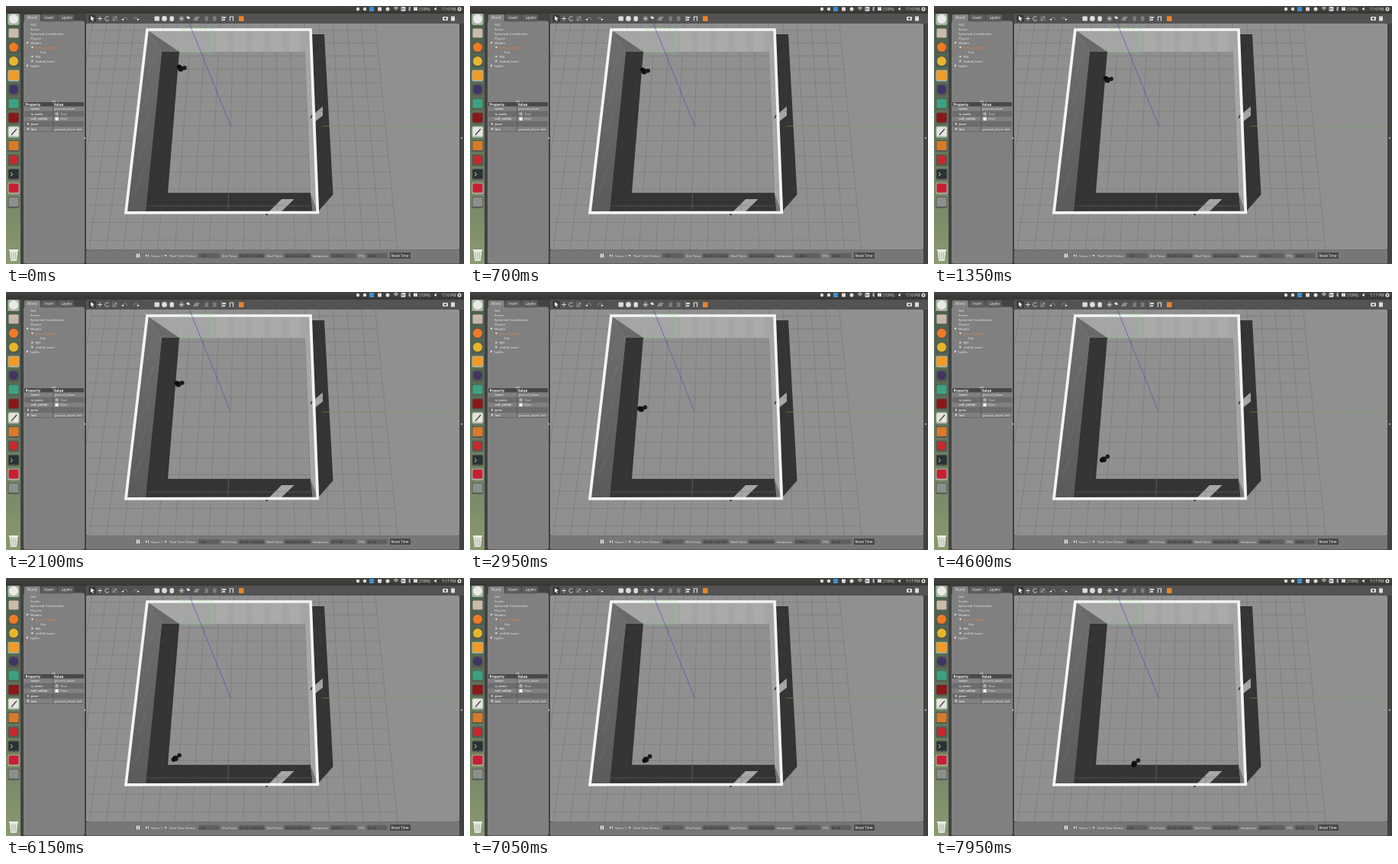
These frames come from a looping animation (600 px wide and 338 px high, 8000 ms). An HTML page with a canvas:

```html
<!DOCTYPE html>
<html lang="en">
<head>
<meta charset="utf-8">
<title>Robot simulation</title>
<style>
html, body { margin: 0; width: 100%; height: 100%; overflow: hidden; background: #383838; }
canvas { display: block; width: 600px; height: 338px; }
</style>
</head>
<body>
<canvas id="stage"></canvas>
<script>
const canvas = document.getElementById('stage');
const ratio = window.devicePixelRatio || 1;
canvas.width = 600 * ratio;
canvas.height = 338 * ratio;
const ctx = canvas.getContext('2d');
ctx.scale(ratio, ratio);

// Drawing helpers
function rect(x, y, w, h, color) {
  ctx.fillStyle = color;
  ctx.fillRect(x, y, w, h);
}
function frame(x, y, w, h, color, width = 0.7) {
  ctx.strokeStyle = color;
  ctx.lineWidth = width;
  ctx.strokeRect(x, y, w, h);
}
function tile(x, y, w, h, r, color) {
  ctx.fillStyle = color;
  ctx.beginPath();
  ctx.roundRect(x, y, w, h, r);
  ctx.fill();
}
function disc(x, y, r, color) {
  ctx.fillStyle = color;
  ctx.beginPath();
  ctx.arc(x, y, r, 0, 2 * Math.PI);
  ctx.fill();
}
function arc(x, y, r, from, to, color) {
  ctx.beginPath();
  ctx.arc(x, y, r, from, to);
  ctx.strokeStyle = color;
  ctx.lineWidth = 0.9;
  ctx.stroke();
}
function trace(points) {
  ctx.beginPath();
  for (let i = 0; i < points.length; i += 2) ctx.lineTo(points[i], points[i + 1]);
}
function poly(color, ...points) {
  trace(points);
  ctx.fillStyle = color;
  ctx.fill();
}
function line(color, width, ...points) {
  trace(points);
  ctx.strokeStyle = color;
  ctx.lineWidth = width;
  ctx.stroke();
}
function text(value, x, y, color, size = 4.3, weight = 400) {
  ctx.font = `${weight} ${size}px "Open Sans", "Noto Sans", sans-serif`;
  ctx.fillStyle = color;
  ctx.fillText(value, x, y);
}
function vertical(y0, y1, ...colors) {
  const g = ctx.createLinearGradient(0, y0, 0, y1);
  colors.forEach((c, i) => g.addColorStop(i / (colors.length - 1), c));
  return g;
}

const icon = '#ddd';

function drawTopBar(t) {
  rect(0, 0, 600, 10, vertical(0, 10, '#454340', '#383633'));
  disc(461, 4, 2.2, icon);
  disc(470, 4, 2.2, icon);
  tile(476, 1, 6, 6, 1, '#3b8fd8');
  tile(487, 1.5, 5, 5, 1, icon);
  disc(500, 4, 2.5, icon);
  for (let r = 1.5; r < 5; r += 1.5) arc(511, 6, r, -2.4, -0.75, icon);
  tile(517.5, 1, 6, 5.8, 1, icon);
  text('En', 518.2, 5.4, '#393734', 3.6, 600);
  line(icon, 0.7, 527, 2.3, 530, 5, 528.5, 6.3, 528.5, 1, 530, 2.3, 527, 5);
  rect(534, 1.5, 5, 4.5, icon);
  text('(100%)', 541, 5.6, icon, 4.7);
  poly(icon, 561, 3, 562.3, 3, 564, 1.3, 564, 6, 562.3, 4.7, 561, 4.7);
  text(t < 3000 ? '7:16 PM' : '7:17 PM', 571, 5.8, '#e4e2dd', 4.9);
  disc(594, 4, 2.6, icon);
  disc(594, 4, 1, '#393734');
}

function drawLauncher() {
  rect(0, 10, 19, 328, vertical(10, 338, '#47604a', '#62765a', '#8a9a72'));
  const colors = ['#e9ece6', '#c9b9a8', '#ef7a21', '#e5b72b', '#f39a24', '#3f3663', '#3ca27f',
    '#8c1719', '#e6e6e0', '#d97a2b', '#c6282c', '#2b3233', '#c81f35', '#8b908a'];
  colors.forEach((color, i) => {
    const y = 17 + i * 18.45;
    tile(2.5, y - 7, 15, 15, 2, i % 4 ? '#555a55' : '#a9b3a6');
    if ([0, 2, 3, 5, 10].includes(i)) disc(10, y, 6, color);
    else tile(3.5, y - 6, 13, 12, 1.5, color);
  });
  line('#444', 1.3, 7, 169, 14, 161);
  line('#eee', 0.9, 6, 218, 8.5, 220.5, 6, 223);
  poly('#dfe3da', 4.5, 321, 15.5, 321, 14, 334, 6, 334);
  rect(4, 319, 12, 2, '#eef0ea');
  for (let x = 7.5; x < 13; x += 2.5) line('#9ca596', 0.6, x, 323, x, 332);
}

function arrow(x, y, open) {
  if (open) poly('#eee', x - 1.6, y - 1, x + 1.6, y - 1, x, y + 1.2);
  else poly('#eee', x - 1, y - 1.6, x + 1.4, y, x - 1, y + 1.6);
}

function drawSidePanel() {
  rect(19, 10, 86, 328, '#424242');
  tile(23, 19.5, 80, 318, 3, '#808080');
  ['World', 'Insert', 'Layers'].forEach((label, i) => {
    tile(24 + i * 22, 11, 21, 9.5, 1.5, i ? '#5c5c5c' : '#808080');
    text(label, 28 + i * 22.2, 17, '#eee', 4.6);
  });
  // Each leading space is one tree level; + is open and > is closed
  const tree = ['GUI', 'Scene', 'Spherical Coordinates', 'Physics', '+Models',
    ' +ground_plane', '  link', ' >RRL', ' >mobile_base', '>Lights'];
  tree.forEach((entry, i) => {
    const x = 32 + 6.5 * entry.search(/\S/), y = 26 + i * 5.95;
    if (/[+>]/.test(entry)) arrow(x - 4, y - 1.5, entry.includes('+'));
    text(entry.replace(/[ +>]/g, ''). replace('lC', 'l C'), x, y,
      entry.includes('ground') ? '#e77c35' : '#eee');
  });
  rect(60, 124.5, 5, 0.9, '#ddd');
  rect(24, 126, 78, 6, '#484848');
  text('Property', 25.5, 130.8, '#f0f0f0', 4.5, 700);
  text('Value', 62.5, 130.8, '#f0f0f0', 4.5, 700);
  const properties = [['name', 'ground_plane'], ['is_static', 'True'], ['self_collide', 'False'],
    ['pose', ''], ['link', 'ground_plane::link']];
  properties.forEach(([name, value], i) => {
    const y = 131.5 + i * 6.6, checkbox = i === 1 || i === 2;
    rect(24, y, 78, 6.6, i % 2 ? '#6c6c6c' : '#808080');
    line('#505050', 0.5, 24, y + 6.6, 102, y + 6.6);
    if (i > 2) arrow(29, y + 3.2, false);
    text(name, 32.5, y + 4.6, '#f2f2f2', 4.2, 600);
    text(value, checkbox ? 71 : 63.5, y + 4.6, '#e8e8e8', 4.2);
    if (checkbox) tile(64.5, y + 1.1, 4.2, 4.2, 0.5, i === 1 ? '#aaa' : '#fff');
  });
  line('#4c4c4c', 0.5, 61.5, 126, 61.5, 164);
  poly(icon, 103.8, 171.5, 102, 173, 103.8, 174.5);
}

function drawToolbar() {
  rect(105, 10, 495, 13, '#535353');
  tile(108.5, 11.5, 9, 9.5, 1, '#383838');
  poly('#eee', 111, 13, 116, 16.5, 113.7, 17, 114.8, 19.5, 113.5, 20, 112.5, 17.8, 111, 19);
  line(icon, 0.9, 120, 16.5, 126, 16.5);
  line(icon, 0.9, 123, 13.5, 123, 19.5);
  arc(132.5, 16.5, 2.7, 0.4, 5.6, icon);
  line(icon, 0.9, 140, 19, 145, 14);
  frame(140, 14, 5, 5, '#aaa', 0.5);
  for (const side of [-1, 1]) {
    const x = 163 + side * 7;
    arc(x, 18, 3, -Math.PI, 0, '#888');
    arrow(x + side * 3, 18, true);
  }
  tile(194.5, 13.5, 6.5, 6, 1, icon);
  disc(207.5, 16.5, 3.4, icon);
  tile(214.5, 13.2, 5.5, 6.8, 2, icon);
  for (let a = 0; a < 3; a += Math.PI / 4) {
    const dx = Math.cos(a) * 3.5, dy = Math.sin(a) * 3.5;
    line(icon, 0.7, 230 - dx, 16.5 - dy, 230 + dx, 16.5 + dy);
  }
  poly(icon, 236, 14, 240, 13.5, 241, 17, 238, 17);
  for (let x = 247; x < 252; x += 2) line(icon, 0.8, x + 2, 14, x - 1, 19);
  rect(260.5, 13.5, 4.5, 6, '#7c7c7c');
  rect(271, 13.5, 4.5, 6, '#7c7c7c');
  line(icon, 0.9, 283, 13, 283, 20);
  rect(284, 14, 4, 2, icon);
  rect(284, 17, 3, 2, icon);
  line(icon, 1.2, 293.5, 19.5, 293.5, 14, 297.5, 14, 297.5, 19.5);
  tile(305, 13.2, 6.5, 6.8, 1, '#ee8327');
  tile(572, 14, 7, 5, 1, icon);
  disc(575.5, 16.5, 1.5, '#555');
  rect(583, 13.5, 5, 6, icon);
}

// Ground coordinates in metres to stage position
function project(across, toward) {
  const scale = 1 / (1 - 0.0127 * toward);
  const down = 19.5 * toward * scale;
  return [294 + 20.3 * across * scale - 0.034 * down, 157 + down];
}

// Time travelled since a start, with a soft pull-away of the given width
function travel(t, start, width) {
  return width * Math.log(1 + Math.exp((t - start) / width));
}

// Drives down to the corner, stops to turn, then follows the near wall
function drawRobot(t) {
  const descent = Math.min(0.04 * travel(t, 1150, 400), 155);
  const along = 0.0368 * travel(t, 6850, 150);
  const x = 229.5 - 7.5 * Math.sqrt(descent / 155) + along;
  const y = 81.3 + descent + 0.17 * along;
  disc(x + 5, y - 1 - descent * 0.02, 2.8, '#1b1b1b');
  disc(x, y, 3.7, '#161616');
  disc(x + (x - 290) * 0.035, y + (y - 180) * 0.025, 3, '#0d0d0d');
}

function drawScene(t) {
  ctx.save();
  ctx.beginPath();
  ctx.roundRect(105, 22.8, 489, 296.5, 2);
  ctx.clip();
  rect(105, 22, 490, 298, '#909090');

  const shadow = '#343434', lit = '#a6a6a6';
  poly(shadow, 399, 37, 417, 37, 428.5, 247, 410, 268);
  poly(shadow, 204, 60, 227, 60, 212, 244.7, 399, 244.7, 403, 270, 182, 270);
  poly(lit, 415, 131.5, 415, 143.5, 399, 156, 399, 145);
  poly(lit, 361, 253, 377.5, 253, 361, 269, 345, 269);

  const grid = 'rgba(75,75,75,.32)';
  for (let i = -10; i <= 10; i++) {
    line(grid, 0.7, ...project(i, -10), ...project(i, 10));
    line(grid, 0.7, ...project(-10, i), ...project(10, i));
  }
  line('rgba(145,145,145,.5)', 0.6, 183, 262, 403, 262);
  line('rgba(145,145,145,.6)', 0.6, 291.5, 245, 291, 266);
  line('rgba(115,170,90,.8)', 0.6, 415, 157.4, 595, 158);

  // Walls seen from above
  poly('#a5a5a5', 186, 32, 398, 32, 392, 60, 204, 60);
  for (let x = 275; x < 380; x += 24) rect(x, 33, 15, 27, 'rgba(190,190,190,.2)');
  poly('#696969', 186, 32, 227, 60, 204, 60);
  poly(vertical(32, 270, '#6e6e6e', '#5b5b5b'), 186, 32, 204, 60, 183, 270, 158, 270);
  for (let y = 75; y < 260; y += 38) {
    const x = 192 - (y - 75) * 0.11;
    line('rgba(140,140,140,.2)', 1.5, x - 6, y + 14, x + 5, y - 14);
  }
  poly(lit, 398, 32, 392, 60, 399, 244.7, 402, 270, 408, 270);
  poly('#777', 399, 244.7, 402, 270, 408, 270);
  line('#222', 1.2, 399, 147, 401, 143);
  rect(340, 271.5, 3, 2.5, '#333');

  trace([185, 31, 399, 31, 408.3, 270.3, 157, 270.8]);
  ctx.closePath();
  ctx.strokeStyle = '#f4f4f4';
  ctx.lineWidth = 3.7;
  ctx.stroke();

  frame(229.5, 29, 40.5, 32, 'rgba(125,225,125,.6)', 0.6);
  frame(232, 31, 35.5, 28, 'rgba(125,225,125,.35)', 0.6);
  line('#4a4cb5', 0.65, 239.8, 22, 294.5, 157.5);
  drawRobot(t);
  ctx.restore();
  poly(icon, 597.5, 171.5, 595.7, 173, 597.5, 174.5);
}

function clock(ms) {
  const s = Math.floor(ms / 1000);
  const pad = (n, size) => String(n).padStart(size, '0');
  return `00 00:${pad(Math.floor(s / 60), 2)}:${pad(s % 60, 2)}.${pad(ms % 1000, 3)}`;
}

function readout(label, x, value, fieldX, width) {
  text(label, x, 328.8, '#e6e6e6');
  rect(fieldX, 323.8, width, 6.5, '#606060');
  text(value, fieldX + 1.5, 328.8, '#262626');
}

// The simulation runs about twice as fast as playback
function drawStatusBar(t) {
  tile(105, 319.3, 489, 18.2, 2, '#777');
  rect(171, 324.5, 1.4, 5, '#fff');
  rect(173.6, 324.5, 1.4, 5, '#fff');
  arrow(184, 327, false);
  rect(186.3, 325, 0.8, 4, icon);
  text('Steps: 1', 190, 328.8, '#e6e6e6');
  arrow(209, 327.3, true);
  const iterations = 212980 + Math.round(t * 1.98);
  const fps = 49.75 + 0.26 * Math.sin(Math.floor(t / 350) * 1.7 - 1.5);
  readout('Real Time Factor:', 214.5, '1.00', 252, 28);
  readout('Sim Time:', 283, clock(iterations + 822900), 304.5, 34);
  readout('Real Time:', 341.5, clock(212998 + Math.round(t * 2.11)), 364.5, 35);
  readout('Iterations:', 402, String(iterations), 425, 34);
  readout('FPS:', 462, fps.toFixed(2), 472.5, 27);
  tile(503, 323, 27, 8, 1, '#484848');
  text('Reset Time', 504.5, 328.8, '#fff', 4.5);
}

function draw(now) {
  const t = Math.floor((now % 8000) / 50) * 50;
  rect(0, 0, 600, 338, '#424242');
  drawScene(t);
  drawToolbar();
  drawSidePanel();
  drawLauncher();
  drawTopBar(t);
  drawStatusBar(t);
  requestAnimationFrame(draw);
}
requestAnimationFrame(draw);
</script>
</body>
</html>
```
